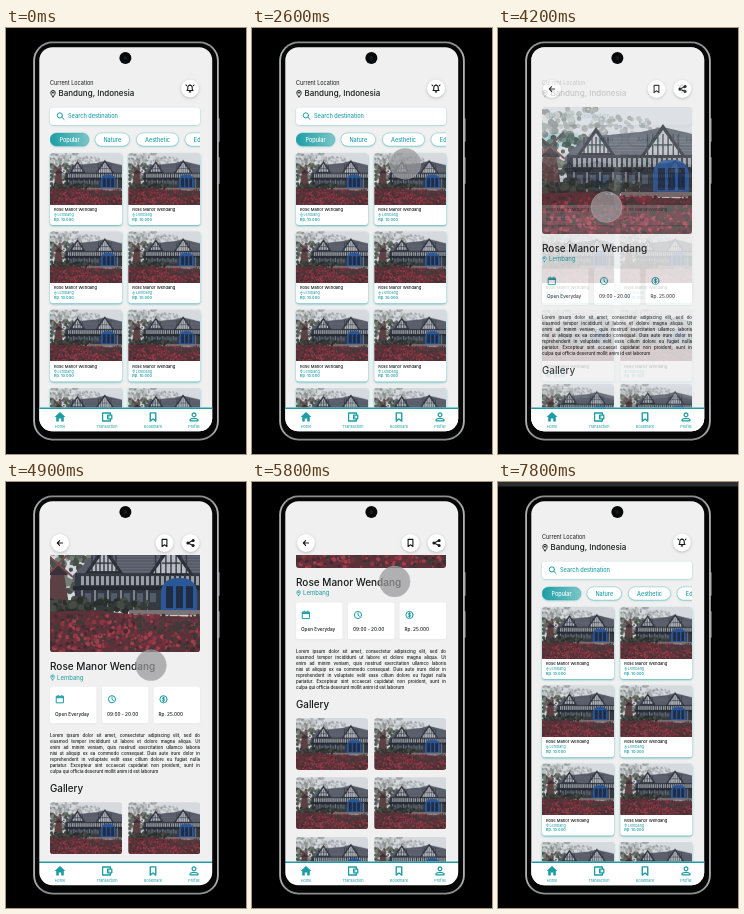
An HTML page with a canvas for the animation above (7900 ms loop, 240x426 px).

```html
<!DOCTYPE html>
<html lang="en">
<head>
<meta charset="utf-8">
<title>Travel app</title>
<style>
html, body { margin: 0; width: 100%; height: 100%; overflow: hidden; background: #000; }
canvas { display: block; width: 240px; height: 426px; }
</style>
</head>
<body>
<canvas id="stage"></canvas>
<script>
const W = 240, H = 426, LOOP = 7900;
const K = Math.max(1, window.devicePixelRatio || 1);
const TEAL = '#1c9ca5', INK = '#161819', PAGE = '#f0f0f0';
const PLACE = 'Rose Manor Wendang', TOWN = 'Lembang';
const LOREM = [
  'Lorem ipsum dolor sit amet, consectetur adipiscing elit, sed do',
  'eiusmod tempor incididunt ut labore et dolore magna aliqua. Ut',
  'enim ad minim veniam, quis nostrud exercitation ullamco laboris',
  'nisi ut aliquip ex ea commodo consequat. Duis aute irure dolor in',
  'reprehenderit in voluptate velit esse cillum dolore eu fugiat nulla',
  'pariatur. Excepteur sint occaecat cupidatat non proident, sunt in',
  'culpa qui officia deserunt mollit anim id est laborum'
];

function makeLayer(canvas, w, h, k) {
  canvas.width = Math.round(w * k);
  canvas.height = Math.round(h * k);
  const c = canvas.getContext('2d');
  c.scale(k, k);
  return c;
}
const stage = makeLayer(document.getElementById('stage'), W, H, K);
const layerCanvas = document.createElement('canvas');
const layer = makeLayer(layerCanvas, W, H, K);
let g = stage;

// ---- helpers ----
function poly(c, color, pts) {
  c.fillStyle = color;
  c.beginPath();
  for (let i = 0; i < pts.length; i += 2) c.lineTo(pts[i], pts[i + 1]);
  c.fill();
}
function box(x, y, w, h, r, color) {
  g.fillStyle = color;
  g.beginPath();
  g.roundRect(x, y, w, h, r);
  g.fill();
}
function raised(color, blur, dy, draw) {
  g.save();
  g.shadowColor = color;
  g.shadowBlur = blur * K;
  g.shadowOffsetY = dy * K;
  draw();
  g.restore();
}
function disc(x, y, r, color) {
  g.fillStyle = color;
  g.beginPath();
  g.arc(x, y, r, 0, 7);
  g.fill();
}
function text(s, x, y, size, color, weight = 400, align = 'left') {
  g.font = `${weight} ${size}px Inter, Roboto, sans-serif`;
  g.textAlign = align;
  g.fillStyle = color;
  g.fillText(s, x, y);
}
function icon(path, x, y, color, width = 1, scale = 1) {
  g.save();
  g.translate(x, y);
  g.scale(scale, scale);
  g.strokeStyle = color;
  g.lineWidth = width;
  g.lineJoin = g.lineCap = 'round';
  g.stroke(new Path2D(path));
  g.restore();
}
function clipped(x, y, w, h, r, draw) {
  g.save();
  g.beginPath();
  g.roundRect(x, y, w, h, r);
  g.clip();
  draw();
  g.restore();
}

const ICON = {
  pin: 'M0 3.6C-1.6 1.6-2.3.6-2.3-.8A2.3 2.3 0 0 1 2.3-.8C2.3.6 1.6 1.6 0 3.6ZM-.7-.8a.7.7 0 1 0 1.4 0a.7.7 0 1 0-1.4 0',
  lens: 'M2-.6a2.6 2.6 0 1 1-5.2 0a2.6 2.6 0 1 1 5.2 0M1.4 1.3L3.6 3.5',
  bell: 'M-3 2H3L2.2.8V-1A2.2 2.2 0 0 0-2.2-1V.8ZM-.7 3.4H.7M0-3.2V-4M-3.4-2.8L-4-3.5M3.4-2.8L4-3.5',
  back: 'M2.6 0H-2.6M-.4-2.3L-2.7 0L-.4 2.3',
  mark: 'M-2.4-3.6H2.4V3.6L0 1.8L-2.4 3.6Z',
  share: 'M2.5-2.6L-2.5 0L2.5 2.6',
  date: 'M-3.4-3H3.4V3.6H-3.4ZM-3.4-1.5H3.4M-3.4-2.3H3.4M-1.8-4V-3M1.8-4V-3',
  clock: 'M3.6 0a3.6 3.6 0 1 1-7.2 0a3.6 3.6 0 1 1 7.2 0M0-2V.2L1.4 1.2',
  coin: 'M3.6 0a3.6 3.6 0 1 1-7.2 0a3.6 3.6 0 1 1 7.2 0M1.2-1.2C.3-2-1.2-1.7-1.2-.8C-1.2.2 1.2-.2 1.2.8C1.2 1.7-.4 2-1.3 1.2M0-2.4V2.4',
  wallet: 'M3.4-1.8V-4H-4.4V4H3.4V1.8M.6-1.8H4.8V1.8H.6ZM2-.1V.1',
  user: 'M1.9-2.2a1.9 1.9 0 1 1-3.8 0a1.9 1.9 0 1 1 3.8 0M-4 3.8V2.8C-3 1 3 1 4 2.8V3.8Z'
};

// ---- house picture ----
const PW = 176, PH = 127, PK = 2;
const photo = document.createElement('canvas');
(function paintPhoto() {
  const c = makeLayer(photo, PW, PH, PK);
  let seed = 11;
  const rnd = () => (seed = seed * 16807 % 2147483647) / 2147483647;
  const rect = (color, x, y, w, h) => { c.fillStyle = color; c.fillRect(x, y, w, h); };
  const dots = (n, colors, x, y, w, h, r) => {
    for (let i = 0; i < n; i++) {
      c.fillStyle = colors[i % colors.length];
      c.beginPath();
      c.arc(x + rnd() * w, y + rnd() * h, r * (.5 + rnd()), 0, 7);
      c.fill();
    }
  };
  rect('#d6d9de', 0, 0, PW, PH);
  // trees
  dots(110, ['#a4aaa9', '#8b918f', '#bcc1c2'], 0, 2, 76, 34, 2.6);
  dots(90, ['#5d655f', '#757d77', '#474f49'], 0, 28, 62, 40, 3.4);
  dots(50, ['#b3b8bb', '#9da3a5'], 70, 10, 60, 18, 2);
  // roof and wall
  poly(c, '#565b67', [36, 50, 56, 30, 112, 25, 134, 20, 176, 30, 176, 54, 36, 54]);
  for (let y = 31; y < 50; y += 3) rect('rgba(130,136,150,.4)', 54, y, 122, .8);
  rect('#343942', 38, 48, 138, 38);
  rect('#9a9ea7', 42, 51, 134, 9);
  for (let x = 42; x < 176; x += 5) rect('#343942', x, 50, 2, 11);
  const gable = (x, y, w, h) => {
    poly(c, '#2b2f38', [x, y - 4, x + w / 2 + 5, y + h + 2, x - w / 2 - 5, y + h + 2]);
    poly(c, '#b9bcc4', [x, y + 2, x + w / 2, y + h, x - w / 2, y + h]);
    for (let i = -3; i <= 3; i++) rect('#353a44', x + i * w / 7 - .7, y + 6, 1.4, h - 6);
    rect('#353a44', x - w / 4, y + h * .6, w / 2, 1.4);
  };
  gable(67, 24, 28, 22);
  gable(134, 21, 36, 27);
  // porch with the blue arch
  rect('#24282f', 36, 61, 140, 4);
  for (let x = 44; x < 120; x += 13) {
    rect('#7d838f', x, 65, 2, 20);
    rect('#525c6b', x + 4, 68, 6, 9);
  }
  c.fillStyle = '#2a5798';
  c.beginPath();
  c.roundRect(124, 53, 36, 32, [14, 14, 0, 0]);
  c.fill();
  for (let x = 129; x < 158; x += 10) rect('#1f2c44', x, 61, 7, 22);
  rect('#6c717b', 163, 62, 3, 24);
  // windmill
  poly(c, '#5c4144', [14, 48, 27, 48, 34, 92, 8, 92]);
  poly(c, '#39313a', [11, 50, 21, 37, 31, 50]);
  c.strokeStyle = '#76494d';
  c.lineWidth = 2;
  c.beginPath();
  c.moveTo(6, 26); c.lineTo(36, 52);
  c.moveTo(35, 25); c.lineTo(7, 53);
  c.stroke();
  // garden
  dots(120, ['#343a36', '#464b45', '#2a2e2c'], 0, 74, 110, 14, 3);
  poly(c, '#5b3239', [0, 87, 60, 85, 100, 90, 176, 92, 176, 127, 0, 127]);
  rect('#7b7475', 92, 85, 84, 5);
  dots(520, ['#8c3543', '#a23f4e', '#452b30', '#393c37', '#71303b'], 0, 89, 176, 38, 1.7);
  dots(130, ['#4c3a3c', '#3c3b39', '#6a3540'], 100, 92, 76, 14, 1.8);
})();

// Fills the box with the picture, cropped evenly around its centre.
function picture(x, y, w, h, r) {
  const s = Math.max(w / PW, h / PH);
  const sw = w / s, sh = h / s;
  clipped(x, y, w, h, r, () => {
    g.imageSmoothingQuality = 'high';
    g.drawImage(photo, (PW - sw) / 2 * PK, (PH - sh) / 2 * PK, sw * PK, sh * PK, x, y, w, h);
  });
}

// ---- interface parts ----
function roundButton(x, y, name) {
  raised('rgba(0,0,0,.22)', 3, .8, () => disc(x, y, 9, '#fff'));
  icon(ICON[name], x, y, INK, 1.1);
  if (name === 'share') {
    disc(x + 2.6, y - 2.6, 1.5, INK);
    disc(x - 2.6, y, 1.5, INK);
    disc(x + 2.6, y + 2.6, 1.5, INK);
  }
}
function chip(label, x, w, active) {
  let fill = '#fff';
  if (active) {
    fill = g.createLinearGradient(x, 0, x + w, 0);
    fill.addColorStop(0, '#1b9ea5');
    fill.addColorStop(1, '#7cc6c8');
  }
  raised('rgba(22,154,163,.55)', 2, .6, () => box(x, 105, w, 13, 6.5, fill));
  g.strokeStyle = 'rgba(22,154,163,.4)';
  g.lineWidth = .6;
  g.stroke();
  text(label, x + w / 2, 113.6, 5.5, active ? '#fff' : TEAL, 500, 'center');
}
function card(x, y) {
  raised('rgba(22,154,163,.7)', 2.2, 1, () => box(x, y, 72, 72, 3, '#fff'));
  picture(x, y, 72, 52, [3, 3, 0, 0]);
  text(PLACE, x + 4, y + 58.2, 4.1, INK, 500);
  icon(ICON.pin, x + 5.4, y + 61.8, TEAL, .9, .42);
  text(TOWN, x + 7.5, y + 63.2, 3.7, TEAL);
  text('Rp. 10.000', x + 4, y + 68, 3.8, TEAL, 600);
}
function navBar() {
  box(33, 379.5, 174, 25, 0, '#fff');
  box(33, 379.4, 174, 1.5, 0, TEAL);
  poly(g, TEAL, [54, 384, 59.4, 389, 57.8, 389, 57.8, 393.4, 55.2, 393.4, 55.2, 390.4,
    52.8, 390.4, 52.8, 393.4, 50.2, 393.4, 50.2, 389, 48.6, 389]);
  icon(ICON.wallet, 101, 389, TEAL, 1.3);
  icon(ICON.mark, 147, 389, TEAL, 1.2, 1.15);
  icon(ICON.user, 188, 389, TEAL, 1.2);
  [['Home', 54], ['Transaction', 101], ['Bookmark', 147], ['Profile', 188]]
    .forEach(([s, x]) => text(s, x, 399.6, 3.8, TEAL, 400, 'center'));
}
function page() {
  box(33, 18, 174, 386, 0, PAGE);
}

function home(chipScroll) {
  page();
  text('Current Location', 44, 57.4, 5.5, INK);
  icon(ICON.pin, 47, 65.4, INK, 1, .95);
  text('Bandung, Indonesia', 52.5, 68.3, 8, INK, 500);
  roundButton(184, 60.5, 'bell');
  raised('rgba(22,154,163,.45)', 2, .6, () => box(44, 79.5, 150, 17.5, 3, '#fff'));
  icon(ICON.lens, 54.5, 88, TEAL, 1);
  text('Search destination', 62, 90.2, 5.6, TEAL, 500);
  clipped(44, 102, 150, 19, 0, () => {
    chip('Popular', 44 - chipScroll, 39, true);
    chip('Nature', 89 - chipScroll, 34.5);
    chip('Aesthetic', 130.5 - chipScroll, 42);
    chip('Education', 179 - chipScroll, 44);
  });
  clipped(40, 122, 160, 260, 0, () => {
    for (let i = 0; i < 4; i++) {
      card(44, 125 + i * 78.2);
      card(122.3, 125 + i * 78.2);
    }
  });
  navBar();
}

function justified(line, x, y, width, last) {
  if (last) return text(line, x, y, 4.4, INK, 500);
  g.font = '500 4.4px Inter, Roboto, sans-serif';
  const words = line.split(' ');
  const sizes = words.map(w => g.measureText(w).width);
  const gap = (width - sizes.reduce((a, b) => a + b, 0)) / (words.length - 1);
  words.forEach((w, i) => {
    text(w, x, y, 4.4, INK, 500);
    x += sizes[i] + gap;
  });
}
function infoBox(x, name, label) {
  raised('rgba(0,0,0,.06)', 2, .5, () => box(x, 245.5, 46.5, 36.5, 2, '#fff'));
  icon(ICON[name], x + 10, 258, TEAL, 1);
  text(label, x + 5, 274.5, 4.7, INK, 500);
}
function detail(scroll) {
  page();
  clipped(33, 73, 174, 308, 0, () => {
    g.translate(0, -scroll);
    picture(44, 84, 150, 127, 3);
    text(PLACE, 44, 228.6, 10, INK, 500);
    icon(ICON.pin, 46.6, 236, TEAL, 1, .75);
    text(TOWN, 51, 238.4, 6, TEAL);
    infoBox(44, 'date', 'Open Everyday');
    infoBox(96, 'clock', '09:00 - 20.00');
    infoBox(147.5, 'coin', 'Rp. 25.000');
    LOREM.forEach((s, i) => justified(s, 44, 295.6 + i * 6.1, 150, i === LOREM.length - 1));
    text('Gallery', 44, 350.6, 9.8, INK, 500);
    for (let i = 0; i < 3; i++) {
      picture(44, 361 + i * 59.4, 72, 52, 3);
      picture(122.3, 361 + i * 59.4, 72, 52, 3);
    }
  });
  roundButton(54, 61, 'back');
  roundButton(158.5, 61, 'mark');
  roundButton(184.5, 61, 'share');
  navBar();
}

function phoneBody() {
  box(210.6, 90, 3, 24, 1, '#8d8f91');
  box(210.6, 129, 3, 27, 1, '#8d8f91');
  const metal = g.createLinearGradient(27, 0, 213, 0);
  metal.addColorStop(0, '#b4b6b7');
  metal.addColorStop(.05, '#8b8d8f');
  metal.addColorStop(.95, '#8b8d8f');
  metal.addColorStop(1, '#b4b6b7');
  box(27.2, 13.6, 185.6, 398.8, 19, metal);
  box(29, 15.3, 182, 395.4, 17.5, '#060606');
}

// ---- motion ----
const ease = p => p * p * (3 - 2 * p);
function track(keys, t) {
  if (t <= keys[0][0]) return keys[0].slice(1);
  for (let i = 1; i < keys.length; i++) {
    const a = keys[i - 1], b = keys[i];
    if (t <= b[0]) {
      const p = ease((t - a[0]) / (b[0] - a[0]));
      return a.slice(1).map((v, j) => v + (b[j + 1] - v) * p);
    }
  }
  return keys[keys.length - 1].slice(1);
}
const CHIPS = [[1000, 0], [1500, 29], [1750, 29], [2300, 0]];
const SCROLL = [[4650, 5], [5400, 142], [5650, 142], [6350, 0]];
const TOUCH = [
  [150, 258, 300], [900, 150, 122], [1000, 150, 122], [1500, 110, 132], [1750, 109, 132],
  [2300, 150, 126], [2500, 152, 130], [3200, 174, 232], [3950, 108.5, 179], [4250, 108.5, 179],
  [4650, 145, 219], [5400, 145, 82], [5650, 145, 82], [6300, 128, 210], [6600, 78.5, 85],
  [6850, 55, 62], [7200, 55, 62], [7650, 40, -20]
];
const fadeOut = p => 1 - Math.pow(1 - Math.min(1, Math.max(0, p)), 3);

function draw(t) {
  g = stage;
  g.fillStyle = '#000';
  g.fillRect(0, 0, W, H);
  phoneBody();

  const shown = fadeOut((t - 4050) / 350) * (1 - fadeOut((t - 7000) / 350));
  clipped(33.3, 19.2, 172.9, 384, 13, () => {
    if (shown < 1) home(track(CHIPS, t)[0]);
    if (shown > 0) {
      g = layer;
      detail(track(SCROLL, t)[0]);
      g = stage;
      g.globalAlpha = shown;
      g.drawImage(layerCanvas, 0, 0, W, H);
      g.globalAlpha = 1;
    }
    disc(119.4, 30, 6, '#08090a');
    disc(119.4, 30, 2, '#16191f');

    const [x, y] = track(TOUCH, t);
    disc(x, y, 15.5, 'rgba(152,152,154,.72)');
    g.strokeStyle = 'rgba(190,190,192,.4)';
    g.lineWidth = .8;
    g.stroke();
  });

  if (t >= 7750) box(0, 0, W, 4.5, 0, '#2b2c2d');
}

const start = performance.now();
function tick() {
  draw((performance.now() - start) % LOOP);
  requestAnimationFrame(tick);
}
tick();
</script>
</body>
</html>
```
